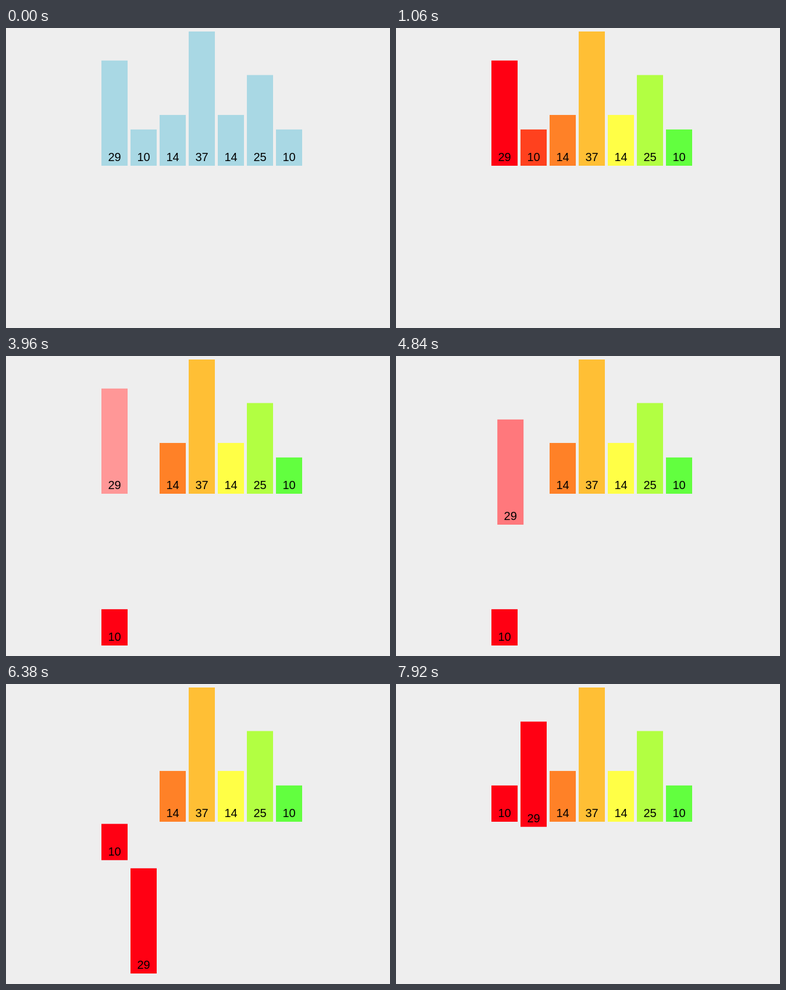
Write an HTML page that moves like this. It is 660 px wide and 514 px high and loops after 8000 ms.

```html
<!DOCTYPE html>
<html lang="en">
<head>
<meta charset="utf-8">
<title>Merge sort</title>
<style>
  html, body { margin: 0; height: 100%; overflow: hidden; background: #eee; }
  svg { display: block; width: 660px; height: 514px; }
  text { font: 20px "Liberation Sans", Arial, sans-serif; text-anchor: middle; }
</style>
</head>
<body>
<svg id="stage" viewBox="0 0 660 514"></svg>
<script>
const LOOP = 8000, HOLD = 7920, DURATION = 650;
const BLUE = [169, 216, 228], RED = [255, 0, 19];
const values = [29, 10, 14, 37, 14, 25, 10];
const groups = [RED, [255, 65, 30], [255, 129, 39], [255, 191, 53],
                [255, 255, 70], [178, 255, 66], [98, 255, 63]];

// Each step: start time, then the new slot, drop and colour of the bars it touches.
const steps = [
  [440, groups.map((color, bar) => ({ bar, color }))],
  [1840, [{ bar: 0, color: [255, 151, 151] }, { bar: 1, color: [255, 213, 153] }]],
  [3235, [{ bar: 1, slot: 0, drop: 260, color: RED }]],
  [4600, [{ bar: 0, slot: 1, drop: 260, color: RED }]],
  [5990, [{ bar: 1, drop: 0 }]],
  [7402, [{ bar: 0, drop: 0 }]]
];

function add(parent, tag, attrs) {
  const el = document.createElementNS("http://www.w3.org/2000/svg", tag);
  for (const name in attrs) el.setAttribute(name, attrs[name]);
  return parent.appendChild(el);
}

const bars = values.map(value => {
  const height = value * 230 / 37;
  const g = add(document.getElementById("stage"), "g");
  const rect = add(g, "rect", { y: -height, width: 45, height });
  add(g, "text", { x: 22.5, y: -8 }).textContent = value;
  return { g, rect };
});

const mix = (a, b, k) => a + (b - a) * k;

function ease(t) {
  t = Math.max(0, Math.min(1, t));
  return t < 0.5 ? 4 * t ** 3 : 1 - 4 * (1 - t) ** 3;
}

function draw(time) {
  const state = values.map((_, slot) => ({ slot, drop: 0, color: BLUE }));
  for (const [start, changes] of steps) {
    const k = ease((time - start) / DURATION);
    for (const { bar, slot, drop, color } of changes) {
      const s = state[bar];
      if (slot !== undefined) s.slot = mix(s.slot, slot, k);
      if (drop !== undefined) s.drop = mix(s.drop, drop, k);
      if (color) s.color = s.color.map((c, i) => mix(c, color[i], k));
    }
  }
  bars.forEach(({ g, rect }, i) => {
    const { slot, drop, color } = state[i];
    g.setAttribute("transform", `translate(${164 + 50 * slot} ${236 + drop})`);
    rect.setAttribute("fill", `rgb(${color.map(Math.round)})`);
  });
}

function frame() {
  draw(Math.min(performance.now() % LOOP, HOLD));
  requestAnimationFrame(frame);
}
frame();
</script>
</body>
</html>
```
